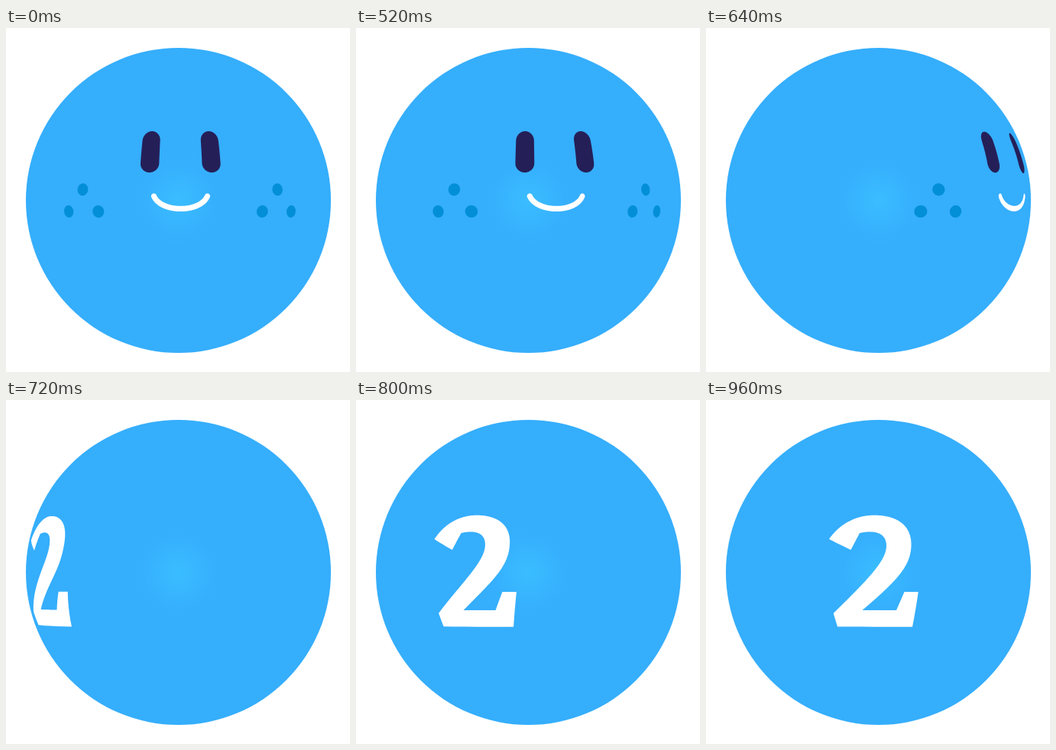
An HTML page with a canvas that plays this animation: 450 px wide and 450 px high, repeating every 1 s.

```html
<!DOCTYPE html>
<html lang="en">
<head>
<meta charset="utf-8">
<title>Turning ball</title>
<style>
  html, body { margin: 0; width: 100%; height: 100%; overflow: hidden; background: #fff; }
  canvas { display: block; width: 450px; height: 450px; }
</style>
</head>
<body>
<canvas id="stage" width="450" height="450"></canvas>
<script>
const ctx = document.getElementById('stage').getContext('2d');
const C = 225.5, R = 199.5;
const LOOP = 1000, STEP = 40;
const START = 400, SPIN = 560, TURN = 200 * Math.PI / 180;
const HALF = Math.PI / 2;

// Surface points are [x, y]: x is the arc length around the equator, y the height on screen.
const ringRadius = y => Math.sqrt(R * R - (y - C) ** 2);
const toSurface = ([x, y]) => [R * Math.asin((x - C) / ringRadius(y)), y];

// Points behind the ball collapse onto its rim; heights shrink a little towards the rim.
function project([x, y], turn) {
  const a = Math.max(-HALF, Math.min(HALF, x / R + turn));
  const squash = 1 - 0.05 * (1 - Math.cos(a)) ** 2;
  return [C + ringRadius(y) * Math.sin(a), C + (y - C) * squash];
}

const mix = (p, q, f) => p.map((v, k) => v + (q[k] - v) * f);
const sample = (n, fn) => Array.from({ length: n + 1 }, (_, i) => fn(i / n));

function fillShape(points, turn, color) {
  ctx.beginPath();
  points.forEach((p, i) => {
    const q = points[(i + 1) % points.length];
    for (let k = 0; k < 6; k++) ctx.lineTo(...project(mix(p, q, k / 6), turn));
  });
  ctx.closePath();
  ctx.fillStyle = color;
  ctx.fill();
}

const arc = (cx, cy, rx, ry, from, to) => sample(20, f => {
  const a = from + (to - from) * f;
  return [cx + rx * Math.cos(a), cy + ry * Math.sin(a)];
});

const bezier = (a, b, c, d) => sample(20, f => {
  const ab = mix(a, b, f), bc = mix(b, c, f), cd = mix(c, d, f);
  return mix(mix(ab, bc, f), mix(bc, cd, f), f);
});

// Outline of a round-capped stroke along a list of points.
function strokeOutline(line, w) {
  const last = line.length - 1;
  const angle = i => {
    const p = line[Math.max(0, i - 1)], q = line[Math.min(last, i + 1)];
    return Math.atan2(q[1] - p[1], q[0] - p[0]);
  };
  const side = sign => line.map(([x, y], i) => {
    const a = angle(i) + sign * HALF;
    return [x + w * Math.cos(a), y + w * Math.sin(a)];
  });
  const cap = (i, from) => arc(...line[i], w, w, angle(i) + from, angle(i) + from + Math.PI);
  return [...side(-1), ...cap(last, -HALF), ...side(1).reverse(), ...cap(0, HALF)];
}

// The face is mirrored about a line slightly right of the middle.
const AXIS = 3;
const mirrored = make => [-1, 1].flatMap(side => make(d => AXIS + side * d));

const eyes = mirrored(at => [[
  ...arc(at(41.8), 147, 12.8, 12, Math.PI, 2 * Math.PI),
  ...arc(at(41.8), 177, 12.8, 12, 0, Math.PI)
]]);

const freckles = mirrored(at => [-1, 0, 1].map(i =>
  arc(at(138.7 + 25 * i), i ? 240 : 211.3, 8.9, 8.1, 0, 2 * Math.PI)));

const mouth = strokeOutline(bezier(
  [AXIS - 35.2, 220], [AXIS - 25.5, 242], [AXIS + 25.5, 242], [AXIS + 35.2, 220]), 3.6);

// The digit is laid out as it looks facing front, then wrapped around the ball.
const digit = [
  ...bezier([161, 182], [175, 161.5], [197, 150.7], [220, 150.7]),
  ...bezier([220, 150.7], [250, 150.7], [268.5, 164], [268.5, 189]),
  ...bezier([268.5, 189], [268.5, 217], [250, 236], [204.5, 275]),
  [249, 275], [259.5, 251], [277.7, 251], [270, 296.8], [172, 296.5],
  ...bezier([166.7, 279], [205, 241], [236, 212], [236, 191]),
  ...bezier([236, 191], [236, 173], [220, 170], [201, 174]),
  [189.5, 196]
].map(toSurface);

// cubic-bezier(.65, 0, .35, 1), solved by bisection.
function ease(x) {
  let lo = 0, hi = 1;
  for (let i = 0; i < 30; i++) {
    const s = (lo + hi) / 2, r = 1 - s;
    const at = 3 * 0.65 * s * r * r + 3 * 0.35 * s * s * r + s ** 3;
    if (at < x) lo = s; else hi = s;
  }
  return lo * lo * (3 - 2 * lo);
}

const skin = ctx.createRadialGradient(C, C, 0, C, C, 70);
skin.addColorStop(0, '#3abdff');
skin.addColorStop(0.65, '#36b0fd');
skin.addColorStop(1, '#35aefc');

function draw(t) {
  const turn = TURN * ease(Math.max(0, Math.min(1, (t - START) / SPIN)));
  ctx.fillStyle = '#fff';
  ctx.fillRect(0, 0, 450, 450);
  ctx.beginPath();
  ctx.arc(C, C, R, 0, 2 * Math.PI);
  ctx.fillStyle = skin;
  ctx.fill();
  freckles.forEach(f => fillShape(f, turn, '#038fd8'));
  eyes.forEach(e => fillShape(e, turn, '#251f58'));
  fillShape(mouth, turn, '#fff');
  fillShape(digit, turn - TURN, '#fff');
}

const begin = performance.now();
function tick() {
  const t = (performance.now() - begin) % LOOP;
  draw(Math.floor(t / STEP) * STEP);
  requestAnimationFrame(tick);
}
tick();
</script>
</body>
</html>
```
